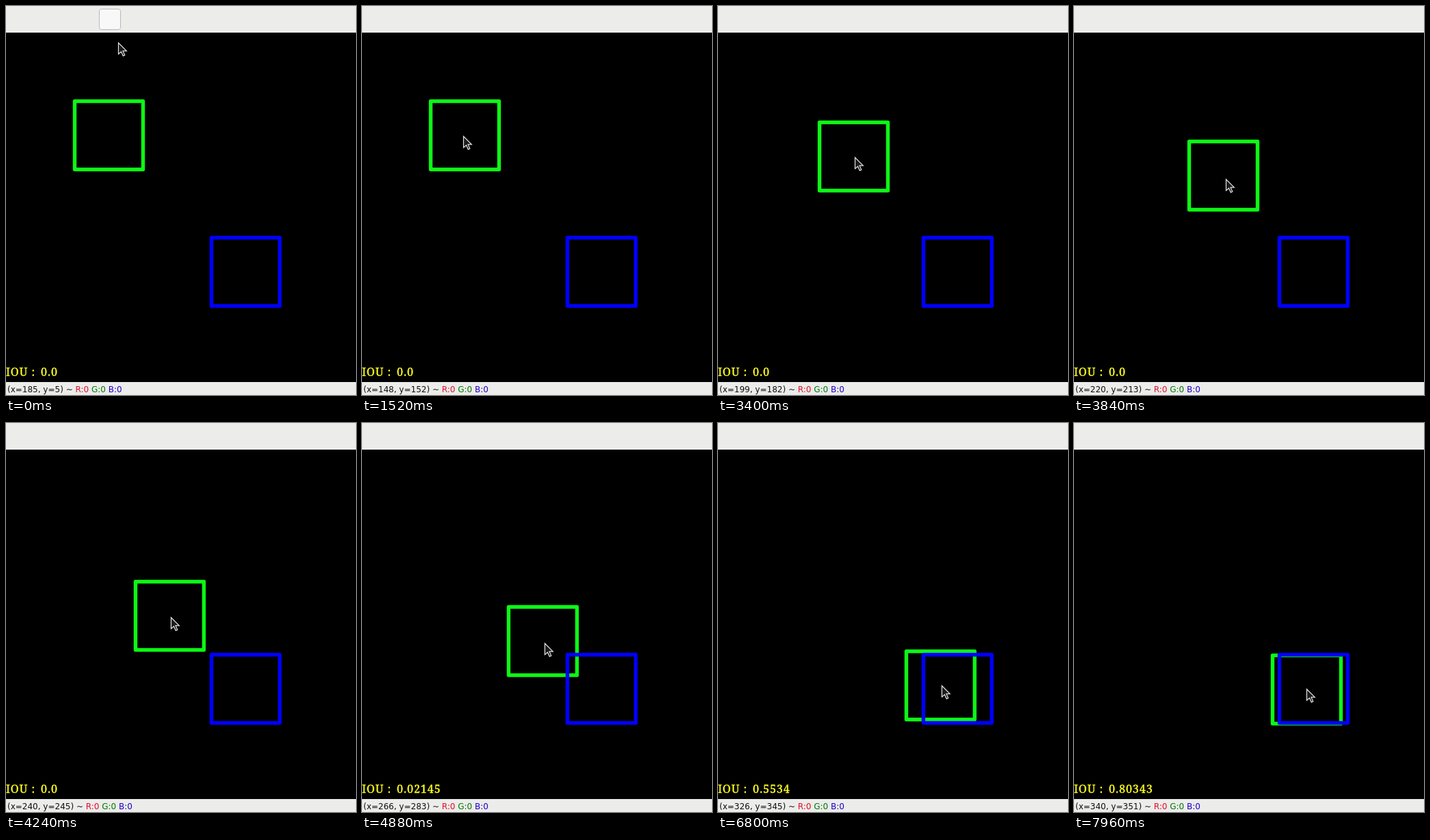
Animation, 512 px wide and 570 px high, one loop 8 s. Source, as an HTML page:

```html
<!DOCTYPE html>
<html lang="en">
<head>
<meta charset="utf-8">
<title>IOU demo</title>
<style>
  html, body { margin: 0; width: 100%; height: 100%; overflow: hidden; background: #000; }
  svg { display: block; width: 512px; height: 570px; }
  text { white-space: pre; }
  .bar { fill: #ececeb; }
  .box { fill: none; stroke-width: 5.4; stroke-linejoin: round; }
  .iou { font: 16px "Noto Serif", serif; letter-spacing: 1px; fill: #ff2; stroke: #ff2; stroke-width: .4; }
  .status { font: 12px "DejaVu Sans", sans-serif; fill: #111; }
</style>
</head>
<body>
<svg viewBox="0 0 512 570">
  <rect width="512" height="570"/>
  <rect class="box" id="moving" width="100" height="100" stroke="#0cf814"/>
  <rect class="box" x="300.5" y="339.5" width="100" height="100" stroke="#00f"/>
  <text class="iou" x="0" y="542">IOU :</text>
  <text class="iou" id="iou" x="51" y="542"></text>
  <rect class="bar" width="512" height="39"/>
  <rect class="bar" y="551" width="512" height="19"/>
  <rect id="button" x="136.5" y="4.5" width="31" height="30" rx="3" fill="#f8f8f8" stroke="#b8b8b8"/>
  <text class="status" x="2" y="566"><tspan id="place"></tspan><tspan fill="#e0102a">R:0 </tspan><tspan id="green" fill="#007a00"></tspan><tspan id="blue" fill="#2000c8"></tspan></text>
  <path id="cursor" d="M.5 .5V17L4.5 13.5 7.3 19.6 9.8 18.5 7.1 12.4H12.3Z" fill="#1c1c1c" stroke="#e4e4e4" stroke-width="1.2"/>
</svg>
<script>
const LOOP = 8000, STEP = 40, TOP = 39, SIDE = 100, HALF = SIDE / 2;
const DRAG_START = 1760, HOVER_END = 80;
const STILL = 350; // centre of the blue box on both axes

// A few stops of the pointer in canvas coordinates: time, x, y
const stops = [
  [0, 164, 13], [840, 167, 147], [1440, 148, 152], [DRAG_START, 148, 152],
  [3400, 197.5, 180.5], [4240, 238.5, 242.5], [4880, 264.4, 280.4],
  [5840, 300.5, 332.6], [7900, 340, 351]
];

const [moving, iou, button, place, green, blue, cursor] =
  ["moving", "iou", "button", "place", "green", "blue", "cursor"]
    .map(id => document.getElementById(id));

function slope(i, axis) {
  const a = stops[i], b = stops[i + 1];
  return a && b ? (b[axis] - a[axis]) / (b[0] - a[0]) : 0;
}

// Harmonic mean of both neighbouring slopes, so the curve never overshoots
function tangent(i, axis) {
  const a = slope(i - 1, axis), b = slope(i, axis);
  return a * b > 0 ? 2 * a * b / (a + b) : 0;
}

function pointer(t) {
  t = Math.min(t, stops.at(-1)[0]);
  const i = Math.max(0, stops.findIndex(s => s[0] >= t) - 1);
  const a = stops[i], b = stops[i + 1], span = b[0] - a[0];
  const u = (t - a[0]) / span, v = 1 - u;
  return [1, 2].map(axis => Math.round(
    a[axis] * v * v * (1 + 2 * u) + b[axis] * u * u * (3 - 2 * u) +
    span * u * v * (v * tangent(i, axis) - u * tangent(i + 1, axis))));
}

const boxCentre = t => t < DRAG_START ? [150, 150] : pointer(t);

function iouText([cx, cy]) {
  const overlap = c => Math.max(0, SIDE - Math.abs(STILL - c));
  const shared = overlap(cx) * overlap(cy);
  return shared ? String(+(shared / (2 * SIDE * SIDE - shared)).toFixed(5)) : "0.0";
}

function onEdge(x, y, cx, cy) {
  const reach = Math.max(Math.abs(x - cx), Math.abs(y - cy));
  return Math.abs(reach - HALF) <= 2;
}

// The cursor leads, the status line follows, then the box and its score
function draw(t) {
  const hovering = t < HOVER_END;
  const [cx, cy] = boxCentre(t);
  moving.setAttribute("x", cx - HALF + .5);
  moving.setAttribute("y", cy - HALF + TOP + .5);
  iou.textContent = iouText(boxCentre(t - 15));

  const [x, y] = hovering ? [185, 5] : pointer(t + 38);
  const inBlue = onEdge(x, y, STILL, STILL);
  const inGreen = !inBlue && onEdge(x, y, cx, cy);
  place.textContent = `(x=${x}, y=${y}) ~ `;
  green.textContent = `G:${inGreen ? 255 : 0} `;
  blue.textContent = `B:${inBlue ? 255 : 0}`;

  const [px, py] = pointer(t + 60);
  cursor.setAttribute("transform", `translate(${px} ${py + TOP - .5})`);
  button.style.display = hovering ? "" : "none";
}

const start = performance.now();
function tick() {
  const t = (performance.now() - start) % LOOP;
  draw(Math.floor(t / STEP) * STEP);
  requestAnimationFrame(tick);
}
tick();
</script>
</body>
</html>
```
